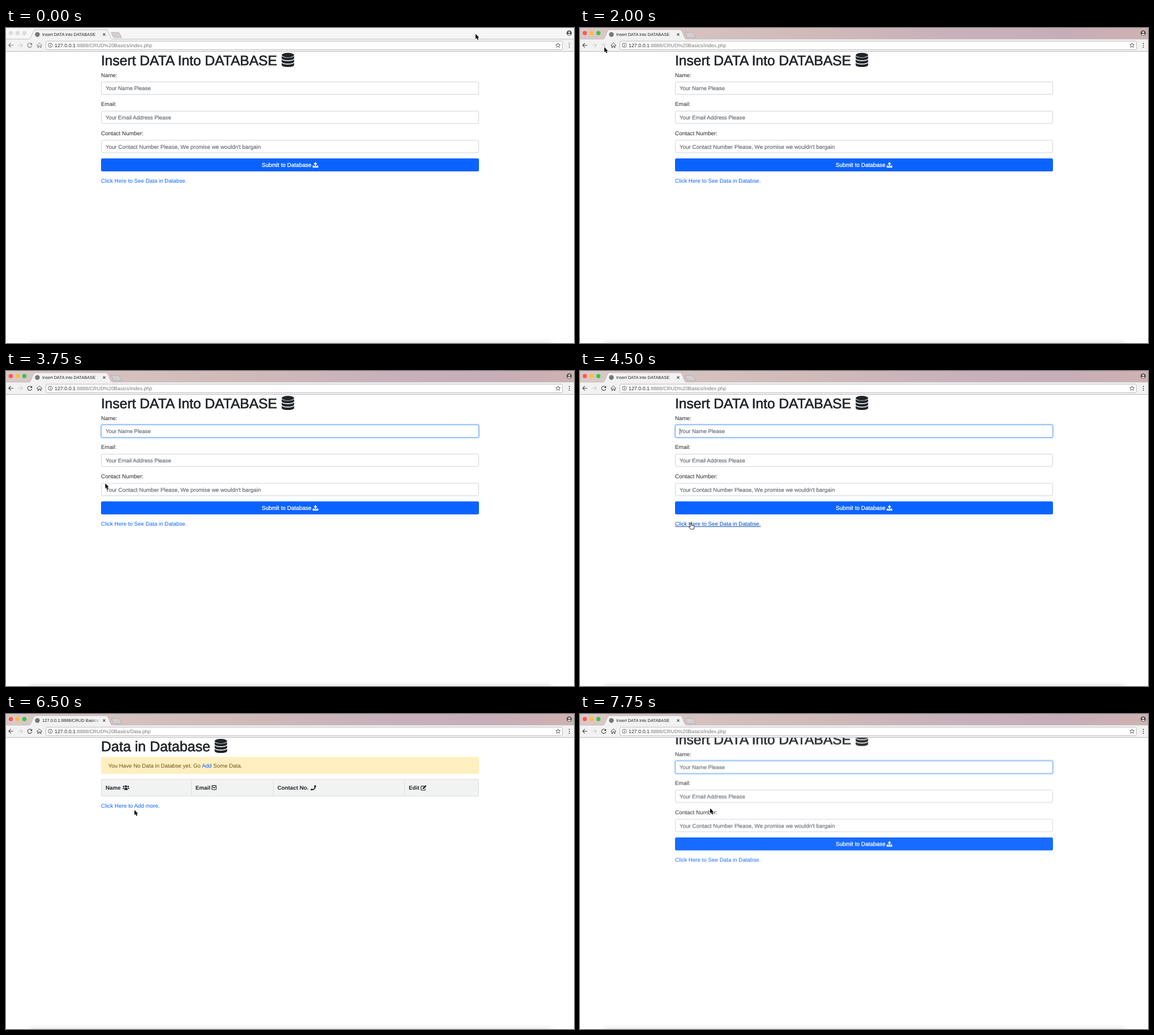
An HTML page that plays this animation: 1004 by 558 pixels, repeating every 8 s.

```html
<!DOCTYPE html>
<html lang="en">
<head>
<meta charset="utf-8">
<title>Insert DATA Into DATABASE</title>
<style>
  html, body { margin: 0; width: 100%; height: 100%; overflow: hidden; background: #fff; }
  svg { display: block; width: 1004px; height: 558px; }
  text { font-family: "Liberation Sans", Arial, sans-serif; font-size: 9.75px; fill: #212529;
         white-space: pre; text-rendering: geometricPrecision; }
  .heading { stroke: #212529; stroke-width: .7px; }
  .bold { font-weight: bold; }
  .hint { fill: #5b636a; stroke: #5b636a; stroke-width: .12px; }
  .link { fill: #0b63ff; }
  .link.hover { fill: #0048b8; text-decoration: underline; }
  .line { fill: none; stroke: currentColor; stroke-width: 1.1; }
  .solid { fill: currentColor; }
  #toolbar { color: #777; }
  #toolbar.active { color: #444; }
</style>
</head>
<body>
<svg viewBox="0 0 1004 558">
  <defs>
    <linearGradient id="titleTint">
      <stop offset="0" stop-color="#d9c9c6"/>
      <stop offset=".4" stop-color="#d1bab9"/>
      <stop offset=".65" stop-color="#c9b1bb"/>
      <stop offset=".85" stop-color="#c7adb8"/>
      <stop offset="1" stop-color="#cfb1b2"/>
    </linearGradient>
    <linearGradient id="tabFade" gradientUnits="userSpaceOnUse" x1="152" x2="167">
      <stop offset="0" stop-color="#222"/>
      <stop offset="1" stop-color="#222" stop-opacity="0"/>
    </linearGradient>
    <filter id="blur" x="-10%" y="-300%" width="120%" height="700%"><feGaussianBlur stdDeviation="5"/></filter>
    <clipPath id="viewport"><rect y="42" width="1004" height="516"/></clipPath>
    <g id="database" fill="#212529">
      <ellipse cx="11" cy="4" rx="11" ry="4"/>
      <path id="disk" d="M0 5.8C3 9.6 19 9.6 22 5.8V9.4C22 14.2 0 14.2 0 9.4Z"/>
      <use href="#disk" y="6"/>
      <use href="#disk" y="12"/>
    </g>
  </defs>

  <g clip-path="url(#viewport)"><g id="insertPage"></g><g id="dataPage"></g></g>
  <rect x="42" y="557" width="922" height="10" fill="#000" opacity=".13" filter="url(#blur)"/>

  <g id="toolbar">
    <rect id="titleBar" width="1004" height="20"/>
    <rect y="19.5" width="1004" height="22" fill="#f3f2f3"/>
    <path d="M0 19.7H41C45 19 47 3 52 3H177C182 3 183 19 188 19.7H1004" fill="#f3f2f3" stroke="#b4b0b2" stroke-width=".8"/>
    <path d="M0 41.5H1004" stroke="#bcb9bb"/>
    <g id="lights"><circle cx="8.5" cy="9" r="3.7"/><circle cx="20.5" cy="9" r="3.7"/><circle cx="32.5" cy="9" r="3.7"/></g>
    <circle cx="55.5" cy="11.5" r="4.2" fill="#777"/>
    <text id="tabTitle" x="64" y="14"></text>
    <path d="M171.5 9.5l4 4m0-4l-4 4" class="line" style="color:#555"/>
    <path d="M186 7.8H198Q200 7.8 201 10L204.5 17H192Q190 17 189 15Z" fill="#d3cfd0" stroke="#aaa5a7" stroke-width=".7"/>
    <g style="color:#555">
      <circle cx="995.5" cy="9" r="4.7" class="solid"/>
      <circle cx="995.5" cy="7.5" r="1.6" fill="#eee"/>
      <path d="M992.5 11.7Q995.5 9 998.5 11.7Q995.5 14 992.5 11.7Z" fill="#eee"/>
    </g>
    <path d="M12.8 30.5H4.8M8.5 26.7L4.8 30.5L8.5 34.3" class="line"/>
    <path d="M21.2 30.5H29.2M25.5 26.7L29.2 30.5L25.5 34.3" class="line" style="color:#ccc"/>
    <g id="reload">
      <path d="M45.1 28.3A3.8 3.8 0 1 0 45.7 31.6" class="line"/>
      <path d="M46.2 26.3V30.1H42.4Z" class="solid"/>
    </g>
    <path id="stop" d="M38.8 27.3l6.4 6.4m0-6.4l-6.4 6.4" class="line" style="color:#d0d0d0"/>
    <path d="M54.5 30.8L59 26.4L63.5 30.8H62V34.6H60.3V31.8H57.7V34.6H56V30.8Z" class="line" style="stroke-width:.9"/>
    <rect x="70.5" y="23.3" width="913" height="15" rx="2" fill="#fff" stroke="#bdbbbc"/>
    <g style="color:#555">
      <circle cx="78.3" cy="30.6" r="3.7" class="line" style="stroke-width:.9"/>
      <path d="M78.3 28.2V29.2M78.3 30V32.8" class="line"/>
    </g>
    <text x="86" y="33.8" style="font-size:8.9px">127.0.0.1<tspan id="urlPath" fill="#777"></tspan></text>
    <path id="star" fill="none" stroke="#555" stroke-width=".9"/>
    <g class="solid"><circle cx="995.7" cy="27.2" r=".95"/><circle cx="995.7" cy="30.6" r=".95"/><circle cx="995.7" cy="34" r=".95"/></g>
  </g>

  <g id="pointer" stroke-linejoin="round">
    <path id="arrow" d="M0 0V8.8L2 7L3.5 10.4L5.2 9.6L3.7 6.4H6.3Z" fill="#000" stroke="#fff" stroke-width=".8" paint-order="stroke"/>
    <path id="hand" d="M-1 0Q0-1 1 0V4L5 5Q6 5.2 6 6.5L5.2 11H-.5L-3.7 7Q-3.2 5.5-1 7Z" fill="#fff" stroke="#000" stroke-width=".8"/>
  </g>
</svg>

<script>
const LOOP = 8000, RELOAD = 2020, OPEN_DATA = 4895, OPEN_INSERT = 7040;
const $ = id => document.getElementById(id);

const label = (x, y, text, cls = '', size = 9.75) =>
  `<text x="${x}" y="${y}" class="${cls}" style="font-size:${size}px">${text}</text>`;
const box = (x, y, w, h, look) => `<rect x="${x}" y="${y}" width="${w}" height="${h}" ${look}/>`;
const icon = (x, y, color, body) => `<g transform="translate(${x} ${y})" style="color:${color}">${body}</g>`;

const fields = [
  ['Name:', 'Your Name Please', 9.75, 9.65],
  ['Email:', 'Your Email Address Please', 9.75, 9.65],
  ['Contact Number:', "Your Contact Number Please, We promise we wouldn't bargain", 9.95, 9.85]
].map(([name, hint, nameSize, hintSize], i) => {
  const y = 95.5 + i * 51.7;
  return label(168, y - 9, name, '', nameSize)
    + box(168.5, y, 667, 22, 'rx="2.5" fill="#fff" stroke="#ced3d8"')
    + (i ? '' : `<g id="focus">${box(167.5, y - 1, 669, 24, 'rx="3.5" fill="none" stroke="#bcd8ff" stroke-width="2"')
      + box(168.5, y, 667, 22, 'rx="2.5" fill="#fff" stroke="#78b2ff"')}</g>
      <path id="caret" d="M176.5 101.5V112.5" stroke="#333" stroke-width=".8"/>`)
    + label(176, y + 14.6, hint, 'hint', hintSize);
}).join('');

$('insertPage').innerHTML =
  label(168, 65.6, 'Insert DATA Into DATABASE', 'heading', 24.6)
  + '<use href="#database" x="487.3" y="44"/>' + fields
  + box(168, 231, 668, 23, 'rx="2.5" fill="#0b63ff"')
  + '<text x="452" y="246" style="fill:#fff;stroke:#fff;stroke-width:.3px;font-size:10px">Submit to Database</text>'
  + icon(542, 237.6, '#fff', `<path class="solid" d="M5 0L8.3 3.6H6.1V6.8H3.9V3.6H1.7Z"/>
      <path class="solid" d="M0 6.2H3V7.7H7V6.2H10V9.6H0Z"/>`)
  + label(168, 274.2, 'Click Here to See Data in Databse.', 'link', 9.78);

const people = `<circle cx="6" cy="2.3" r="2" class="solid"/><path class="solid" d="M2.8 8.5Q2.3 4.7 6 4.7T9.2 8.5Z"/>
  <circle cx="2" cy="2.4" r="1.4" class="solid"/><circle cx="10" cy="2.4" r="1.4" class="solid"/>
  <path class="solid" d="M0 6.8Q0 4 2.8 4.2L2 6.8ZM12 6.8Q12 4 9.2 4.2L10 6.8Z"/>`;
const envelope = `<rect x=".6" y=".6" width="7.4" height="7.4" rx="1" class="line"/>
  <path class="line" d="M1.8 3L4.3 5L6.8 3"/>`;
const phone = '<path class="solid" d="M7.2 0L9.7 .6Q9.7 9.3 .8 9.5L.2 7.1L2.8 5.9L4 7.2Q6.3 6 7.2 3.9L6 2.8Z"/>';
const pencil = `<path class="line" d="M6.2 1.6H1.6Q.6 1.6 .6 2.6V8Q.6 9 1.6 9H7Q8 9 8 8V6.2"/>
  <path class="solid" d="M3.2 7L3.6 4.9L8.4 .1L10.2 1.9L5.4 6.7Z"/>`;
const columns = [
  ['Name', 176, people, 206], ['Email', 335, envelope, 363.5],
  ['Contact No.', 479.7, phone, 538.3], ['Edit', 712, pencil, 733]
].map(([name, x, art, artX]) => label(x, 134, name, 'bold', 9.8) + icon(artX, 126, '#212529', art)).join('');

$('dataPage').innerHTML =
  label(168, 65.6, 'Data in Database', 'heading', 25)
  + '<use href="#database" x="368.8" y="44"/>'
  + box(168, 76, 668, 30, 'rx="2.5" fill="#ffefc1"')
  + label(180.7, 94.5, `<tspan fill="#6b5310">You Have No Data in Databse yet. Go <tspan class="link">Add</tspan> Some Data.</tspan>`, '', 9.73)
  + box(168.5, 115.7, 667, 29.7, 'fill="#f1f2f2" stroke="#dcdfe2"')
  + '<path d="M327.5 115.7v29.7M472.5 115.7v29.7M704.5 115.7v29.7" stroke="#dcdfe2"/>' + columns
  + label(168, 166, 'Click Here to Add more.', 'link', 9.85);

$('star').setAttribute('d', 'M' + Array.from({ length: 10 }, (_, i) => {
  const r = i % 2 ? 1.9 : 4.3, a = i * Math.PI / 5;
  return `${975.8 + r * Math.sin(a)} ${30.8 - r * Math.cos(a)}`;
}).join('L') + 'Z');

// time, x, y
const route = [
  [0, 830, 10.5], [250, 826, 14], [750, 480, 32], [1000, 118, 43], [1250, 57, 42], [1500, 43, 34],
  [2600, 43, 34], [3750, 175.5, 199], [4250, 196, 269], [5500, 196, 270],
  [6250, 225, 190], [6500, 227, 170], [6750, 230, 167], [LOOP, 230, 167]
];
function pointerAt(t) {
  const i = route.findIndex(stop => stop[0] > t);
  const [t0, x0, y0] = route[i - 1], [t1, x1, y1] = route[i];
  const k = (t - t0) / (t1 - t0);
  return [x0 + (x1 - x0) * k, y0 + (y1 - y0) * k];
}

// cubic-bezier(.25, .1, .25, 1)
function ease(x) {
  if (x >= 1) return 1;
  let lo = 0, hi = 1;
  for (let i = 0; i < 20; i++) {
    const s = (lo + hi) / 2;
    if (.75 * s * (1 - s) + s ** 3 < x) lo = s; else hi = s;
  }
  return .3 * lo * (1 - lo) ** 2 + 3 * lo * lo * (1 - lo) + lo ** 3;
}

const show = (id, on) => $(id).setAttribute('visibility', on ? 'inherit' : 'hidden');
function showPage(id, on, age, height) {
  show(id, on);
  const k = ease(age / 1000);
  $(id).setAttribute('transform', `translate(0 ${(k - 1) * height})`);
  $(id).setAttribute('opacity', k);
}

function render(t) {
  const active = t >= 1700, onData = t >= OPEN_DATA && t < OPEN_INSERT;
  const opened = t >= OPEN_INSERT ? OPEN_INSERT : onData ? OPEN_DATA : t >= RELOAD ? RELOAD : -2000;
  const age = t - opened;

  $('toolbar').setAttribute('class', active ? 'active' : '');
  $('titleBar').setAttribute('fill', active ? 'url(#titleTint)' : '#f6f6f6');
  ['#fc5753', '#fdbc40', '#34c748'].forEach((color, i) =>
    $('lights').children[i].setAttribute('fill', active ? color : '#dcdcdc'));
  $('tabTitle').textContent = onData ? '127.0.0.1:8888/CRUD Basics/' : 'Insert DATA Into DATABASE';
  $('tabTitle').style.cssText = onData ? 'font-size:7.6px;fill:url(#tabFade)' : 'font-size:7.45px;fill:#222';
  $('urlPath').textContent = `:8888/CRUD%20Basics/${onData ? 'Data' : 'index'}.php`;
  const stopping = t >= 1750 && t < 2800;
  show('stop', stopping);
  show('reload', !stopping);
  $('reload').style.color = t >= 1450 ? '#444' : '';

  showPage('insertPage', !onData, age, 228);
  showPage('dataPage', onData, age, 119);
  show('focus', !onData && opened > 0);
  show('caret', !onData && opened > 0 && age % 1000 < 500);

  const [x, y] = pointerAt(t);
  const overInsertLink = !onData && age > 1000 && x > 168 && x < 320 && Math.abs(y - 271) < 7;
  const overDataLink = onData && age > 1000 && x < 273 && Math.abs(y - 162) < 7;
  $('insertPage').lastElementChild.classList.toggle('hover', overInsertLink);
  $('dataPage').lastElementChild.classList.toggle('hover', overDataLink);
  const hovering = overInsertLink || overDataLink;
  show('hand', hovering);
  show('arrow', !hovering);
  $('pointer').setAttribute('transform', `translate(${x} ${y})`);
}

function tick() {
  render(performance.now() % LOOP);
  requestAnimationFrame(tick);
}
tick();
</script>
</body>
</html>
```
